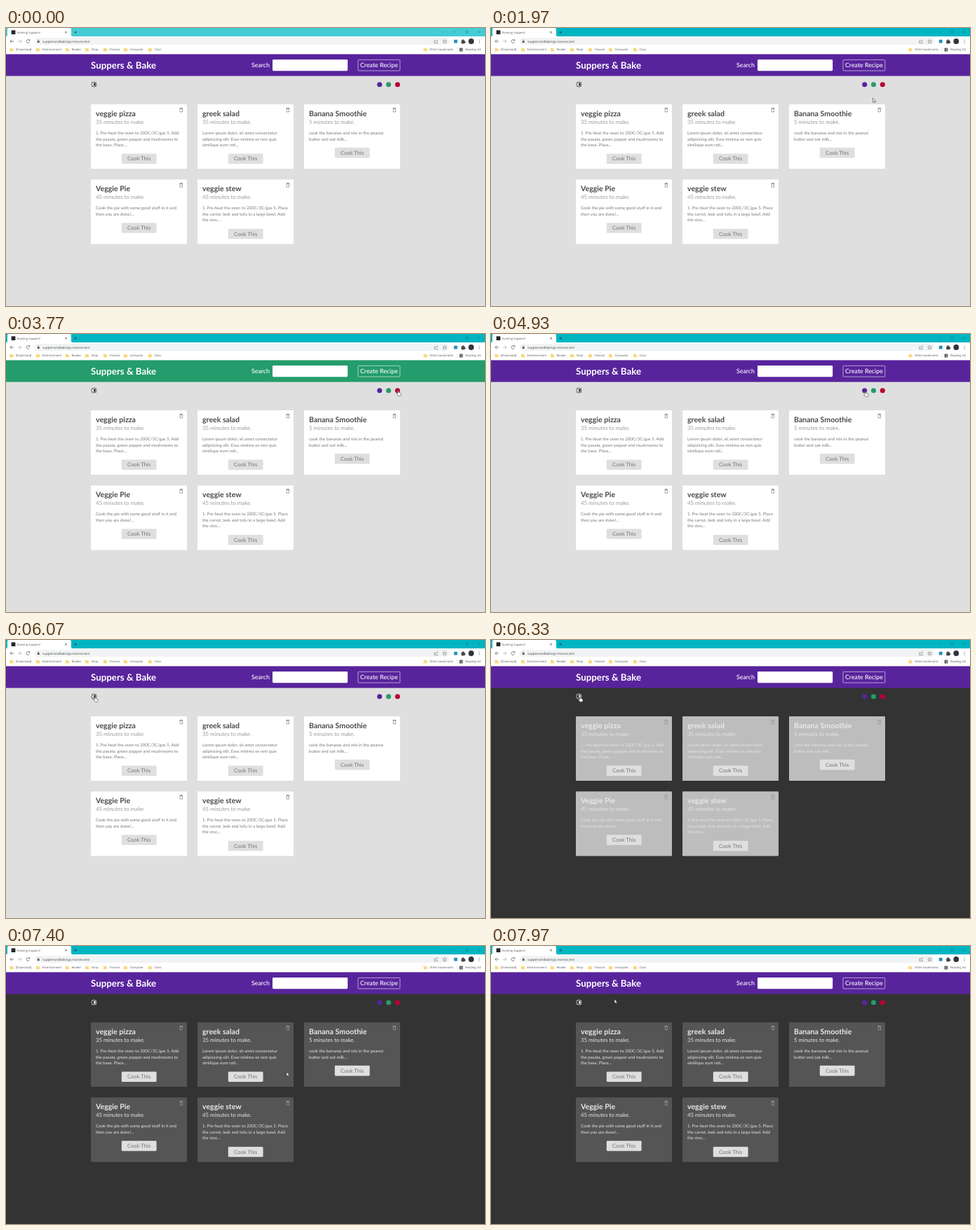
Write an HTML page that moves like this. It is 683x397 px and loops after 8000 ms.

```html
<!DOCTYPE html>
<html lang="en">
<head>
<meta charset="utf-8">
<title>Evening Suppers!</title>
<style>
  html, body { margin: 0; width: 100%; height: 100%; overflow: hidden; }
  svg { display: block; width: 100%; height: 100%; }
  text { font-family: Lato, sans-serif; text-rendering: geometricPrecision; white-space: pre; }
  .chrome { font-family: "Open Sans", sans-serif; font-size: 4.15px; fill: #555; }
  .url { font-size: 4.5px; fill: #444; }
  .line { fill: none; stroke: #555; stroke-width: .7; }
  .brand { font-size: 13.3px; font-weight: 700; fill: #fff; }
  .nav { font-size: 8.8px; font-weight: 500; fill: #fff; }
  .card { fill: var(--card); filter: drop-shadow(.5px .6px .6px rgba(0, 0, 0, .08)); }
  .title { font-size: 10.6px; font-weight: 700; fill: var(--title); }
  .minutes { font-size: 7.85px; fill: var(--minutes); }
  .method { font-size: 6.1px; fill: var(--method); }
  .button { fill: #dfdfdf; }
  .label { font-size: 7.7px; fill: #747474; text-anchor: middle; }
  .trash { fill: var(--trash); fill-rule: evenodd; }
  .pointer { fill: #fff; stroke: #111; stroke-width: 1.3; stroke-linejoin: round; }
</style>
</head>
<body>
<svg id="stage" viewBox="0 0 683 397" preserveAspectRatio="none"></svg>
<script>
const LOOP = 8000;
const PURPLE = [88, 36, 156], GREEN = [36, 156, 107], RED = [183, 2, 51];
const stage = document.getElementById('stage');
const rgb = c => `rgb(${c.map(Math.round)})`;

const rect = (x, y, w, h, fill, r = 0, extra = '') =>
  `<rect x="${x}" y="${y}" width="${w}" height="${h}" rx="${r}" fill="${fill}" ${extra}/>`;
const circle = (x, y, r, fill) => `<circle cx="${x}" cy="${y}" r="${r}" fill="${fill}"/>`;
const text = (x, y, cls, s) => `<text x="${x}" y="${y}" class="${cls}">${s.replace(/&/g, '&amp;')}</text>`;
const line = (d, extra = '') => `<path class="line" d="${d}" ${extra}/>`;
const folder = (x, label) =>
  `<path d="M${x} 28.6h1.9l.7.7h2.4v4h-5z" fill="#f9d877"/>` + text(x + 8.5, 32.3, 'chrome', label);

function browser() {
  const bookmarks = [[5.5, '[Download]'], [43, 'Entertainment'], [85, 'Reader'], [113, 'Shop'],
    [139, 'Finance'], [168, 'Computer'], [203, 'Class'], [595.5, 'Other bookmarks']];
  return rect(0, 0, 683, 13, 'var(--bar)') +
    rect(0, 12, 683, 26, '#fff') +
    `<path d="M0 12.5Q2 12 2 10V2Q2 0 4 0H91Q93 0 93 2V10Q93 12 95 12.5Z" fill="#fff"/>` +
    rect(7.6, 3.2, 5.8, 5.8, '#24272d', .6) +
    text(16, 7.8, 'chrome', 'Evening Suppers!') +
    line('M84.2 4.8l2.6 2.6m0-2.6l-2.6 2.6M97.3 6.1h3.6m-1.8-1.8v3.6', 'style="stroke:#333"') +
    line('M622 4.8l1.2 1.2 1.2-1.2M638.7 5.6h3M656 4.2h3v3h-3zM673.5 4.2l3 3m0-3l-3 3',
      'style="stroke:#155e66;stroke-width:.5" opacity=".75"') +
    // toolbar
    rect(41, 14, 591, 10, '#f1f3f4', 5) +
    line('M11 19H6m2.3-2.4L5.9 19l2.4 2.4') +
    line('M17 19h5m-2.3-2.4l2.4 2.4-2.4 2.4', 'style="stroke:#aaa"') +
    line('M33.4 17.6a2.4 2.4 0 1 0 .2 2.4M33.8 16v2h-2') +
    rect(44.7, 18.5, 3, 2.6, '#555', .3) + line('M45.4 18.6v-.8q0-1 .8-1t.8 1v.8', 'style="stroke-width:.5"') +
    text(52, 20.7, 'chrome url', 'suppersandbakings.morvex.test') +
    line('M612 18h-1.2v3.5h4.6V20M612.5 19.8q.2-2.2 2.8-2.2m-1-1.1l1.1 1.1-1.1 1.1', 'style="stroke-width:.5"') +
    line('M625.5 16.4l.8 1.8 2 .2-1.5 1.3.5 2-1.8-1.1-1.8 1.1.5-2-1.5-1.3 2-.2z', 'style="stroke-width:.5"') +
    rect(638.8, 16.8, 4.8, 4.8, '#258fb5', .5) +
    `<path d="M649.3 17.6h1.5q-.2-1.5.9-1.5t.9 1.5h1.5v1.6q1.5-.2 1.5.9t-1.5.9v1.3h-4.8z" fill="#444"/>` +
    circle(663.3, 19, 3.9, '#30343c') +
    [17, 19, 21].map(y => circle(675, y, .55, '#555')).join('') +
    // bookmarks
    bookmarks.map(b => folder(...b)).join('') +
    line('M643 28v6', 'style="stroke:#ccc;stroke-width:.5"') +
    rect(646.6, 28.6, 4.8, 4.8, '#555', .4) +
    line('M648.2 30h2.4m-2.4 1.2h2.4m-2.4 1.2h2.4', 'style="stroke:#fff;stroke-width:.4"') +
    text(655, 32.3, 'chrome', 'Reading list');
}

function header() {
  const gear = 'M20 15.31L23.31 12 20 8.69V4h-4.69L12 .69 8.69 4H4v4.69L.69 12 4 15.31V20h4.69L12 23.31 15.31 20H20z';
  return rect(0, 37.4, 683, 31.1, 'var(--theme)') +
    text(121, 57.7, 'brand', 'Suppers & Bake') +
    text(350, 56.3, 'nav', 'Search') +
    rect(380, 45, 107.2, 16.2, '#fff', 1.4) +
    rect(502, 45.4, 59.8, 15.6, 'none', 1.2, 'stroke="#fff" stroke-opacity=".8" stroke-width=".7"') +
    text(505, 56.3, 'nav', 'Create Recipe') +
    `<g transform="translate(121.2 76.3) scale(.356)">
      <path d="${gear}" fill="none" stroke="var(--icon)" stroke-width="2"/>
      <path d="M12 6a6 6 0 0 1 0 12z" fill="var(--icon)" stroke="var(--icon)"/></g>` +
    [PURPLE, GREEN, RED].map((c, i) => circle(532.7 + i * 12.8, 80.7, 3.56, rgb(c))).join('');
}

function card([name, minutes, ...method], i) {
  const x = 121 + i % 3 * 152, y = 108.9 + Math.floor(i / 3) * 107.3;
  const buttonY = y + 53.4 + (method.length - 1) * 8.55;
  return rect(x, y, 137, 92.2, 'none', 1.2, 'class="card"') +
    text(x + 7, y + 16.7, 'title', name) +
    text(x + 7, y + 27.8, 'minutes', `${minutes} minutes to make.`) +
    method.map((s, n) => text(x + 7, y + 43.1 + n * 8.55, 'method', s)).join('') +
    rect(x + 43.8, buttonY, 49.8, 14.6, 'none', 1.4, 'class="button"') +
    text(x + 68.6, buttonY + 10, 'label', 'Cook This') +
    `<path class="trash" transform="translate(${x + 124.6} ${y + 3.8}) scale(.356)"
      d="M6 7H18V19Q18 21 16 21H8Q6 21 6 19ZM8 9V19H16V9ZM5 4H8.5L9.5 3H14.5L15.5 4H19V6H5Z"/>`;
}

const recipes = [
  ['veggie pizza', 35, '1. Pre-heat the oven to 200C/3C/gas 5. Add', 'the pasata, green pepper and mushrooms to', 'the base. Place...'],
  ['greek salad', 35, 'Lorem ipsum dolor, sit amet consectetur', 'adipisicing elit. Esse minima ex rem quis', 'similique eum rati...'],
  ['Banana Smoothie', 5, 'cook the bananas and mix in the peanut', 'butter and oat milk...'],
  ['Veggie Pie', 45, 'Cook the pie with some good stuff in it and', 'then you are done!...'],
  ['veggie stew', 45, '1. Pre-heat the oven to 200C/3C/gas 5. Place', 'the carrot, leek and tofu in a large bowl. Add', 'the stoc...']
];

stage.innerHTML = rect(0, 0, 683, 397, 'var(--page)') + browser() + header() + recipes.map(card).join('') +
  `<g id="cursor">
    <path id="arrow" class="pointer" transform="scale(.36)" d="M0 0V17L4 13.2 6.6 19 9 18 6.4 12.2H12Z"/>
    <path id="hand" class="pointer" transform="scale(.36)"
      d="M-2 2Q-2 0 0 0T2 2V7Q11 7.5 11 11V15Q11 21 6 21H2Q-1 21 -3 17L-7 12Q-6 9 -2 12Z"/>
  </g>`;

const [cursor, arrow, hand] = ['cursor', 'arrow', 'hand'].map(id => document.getElementById(id));
const clamp = p => Math.min(1, Math.max(0, p));
const easeOut = p => 1 - (1 - clamp(p)) ** 2;
const smooth = p => p * p * (3 - 2 * p);
const mix = (a, b, p) => a.map((v, i) => v + (b[i] - v) * p);

// Cursor stops: time, x, y
const path = [
  [1070, 684, 243], [1570, 580, 117], [1730, 580, 117], [1970, 544.5, 100], [2260, 530, 87],
  [2500, 532.5, 81.5], [2930, 532.5, 81.5], [3130, 545.5, 81], [3500, 545.5, 81], [3720, 559.3, 81],
  [4300, 559.3, 81], [4600, 534, 82], [5030, 534, 82], [5300, 222, 72], [5470, 222, 72],
  [6070, 127, 81], [7130, 127, 81], [7400, 400, 180], [7540, 528, 205], [7740, 330, 266],
  [7930, 182, 86], [7970, 176, 76]
];
const clicks = [[3330, GREEN], [3850, RED], [4650, PURPLE]];
const DARK_AT = 6270;

function cursorAt(t) {
  const next = path.findIndex(stop => stop[0] > t);
  if (next < 0) return path[path.length - 1].slice(1);
  const [t0, ...from] = path[next - 1], [t1, ...to] = path[next];
  return mix(from, to, smooth((t - t0) / (t1 - t0)));
}

function render(t) {
  const set = (name, value) => stage.style.setProperty('--' + name, value);
  const dark = t >= DARK_AT;
  const theme = clicks.reduce((c, [at, to]) => mix(c, to, easeOut((t - at) / 300)), PURPLE);
  set('theme', rgb(theme));
  set('bar', t < 1070 ? '#43ccd5' : '#00b5c2');
  set('page', dark ? '#333' : '#dfdfdf');
  set('card', rgb(mix([255, 255, 255], [85, 85, 85], easeOut((t - DARK_AT) / 280))));
  set('title', dark ? '#e8e8e8' : '#4a4a4a');
  set('minutes', dark ? '#e4e4e4' : '#9c9c9c');
  set('method', dark ? '#e4e4e4' : '#7a7a7a');
  set('icon', dark ? '#fff' : '#222');
  set('trash', dark ? '#9a9a9a' : '#888');

  const visible = t >= 1070;
  cursor.style.display = visible ? '' : 'none';
  if (!visible) return;
  const [x, y] = cursorAt(t);
  const overTarget = [125.5, 532.7, 545.5, 558.3].some(cx => Math.hypot(x - cx, y - 80.7) < 4);
  cursor.setAttribute('transform', `translate(${x} ${y})`);
  arrow.style.display = overTarget ? 'none' : '';
  hand.style.display = overTarget ? '' : 'none';
}

const start = performance.now();
function tick() {
  render((performance.now() - start) % LOOP);
  requestAnimationFrame(tick);
}
tick();
</script>
</body>
</html>
```
